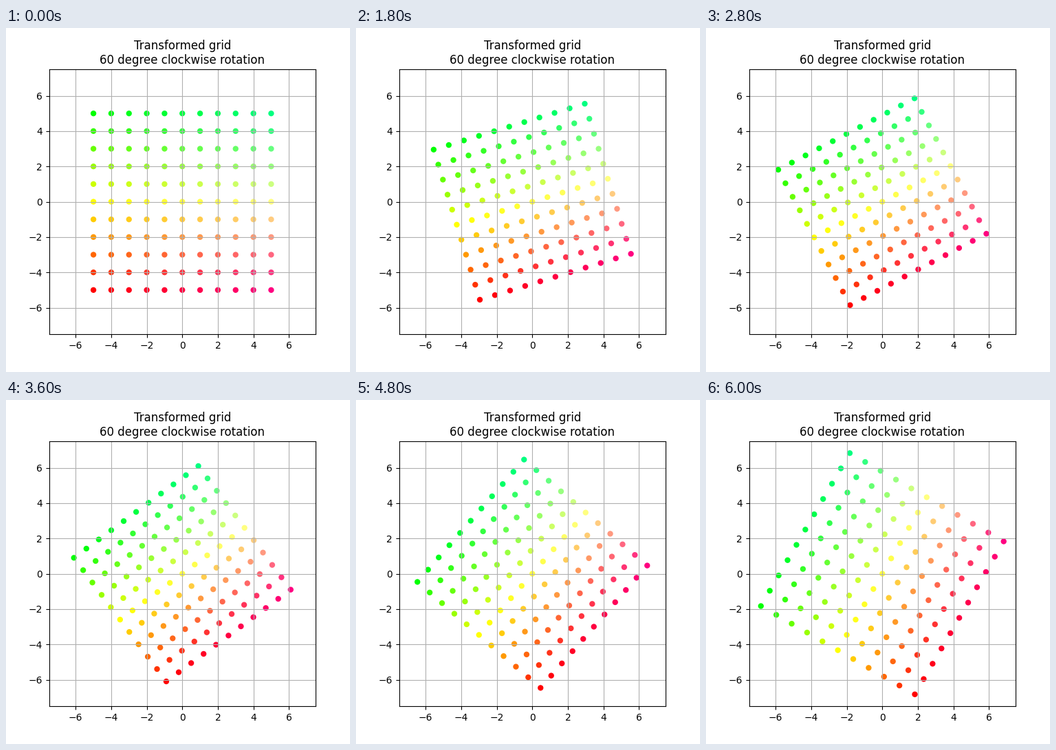
Animation of 500x500 px, one loop 6.2 s. Source, as a matplotlib script:

```python
import numpy as np
import matplotlib.pyplot as plt
from matplotlib.animation import FuncAnimation

STEPS = 30
INTERVAL = 200
ANGLE = np.radians(60)
LIMIT = 7.5


def dot_color(x, y):
    return min(1, 1 - y / 5), min(1, 1 + y / 5), 1 / 4 + x / 20


axis = np.linspace(-5, 5, 11)
grid = np.array([(x, y) for x in axis for y in axis])
colors = [dot_color(x, y) for x, y in grid]

c, s = np.cos(ANGLE), np.sin(ANGLE)
rotation = np.array([[c, -s], [s, c]])
rotated = grid @ rotation.T

fig, ax = plt.subplots(figsize=(5, 5), dpi=100)
dots = ax.scatter(*grid.T, s=36, c=colors, edgecolors="none")
ax.set(xlim=(-LIMIT, LIMIT), ylim=(-LIMIT, LIMIT))
ax.grid(True)
ax.set_title("Transformed grid\n60 degree clockwise rotation")


def update(i):
    # straight-line blend from the identity to the rotation
    t = i / STEPS
    dots.set_offsets((1 - t) * grid + t * rotated)
    return (dots,)


anim = FuncAnimation(fig, update, frames=STEPS + 1, interval=INTERVAL,
                     repeat=True, repeat_delay=0)
plt.show()
```
